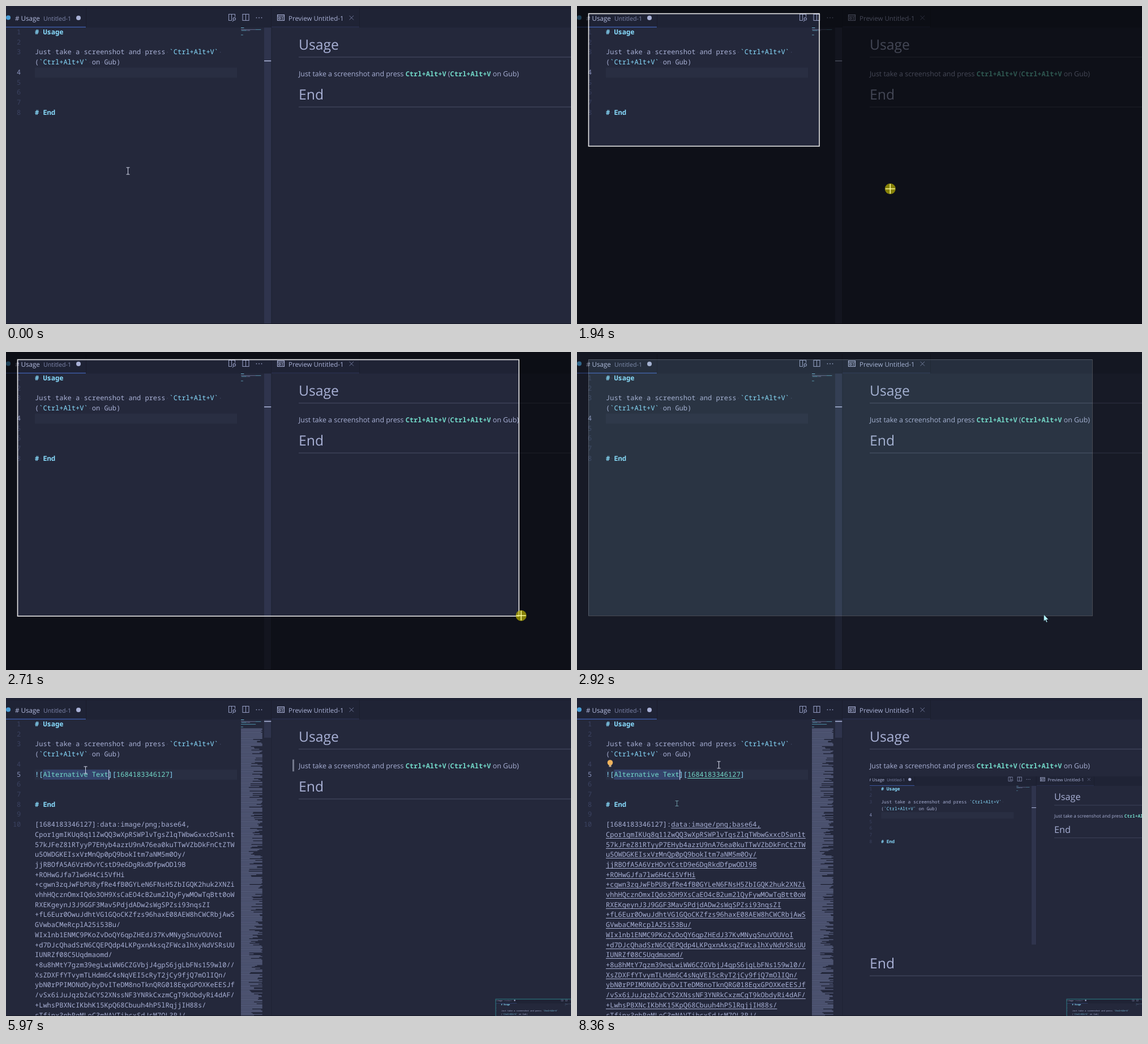
These frames come from a looping animation (998x561 px, 8420 ms). An HTML page with a canvas:

```html
<!DOCTYPE html>
<html lang="en">
<head>
<meta charset="utf-8">
<title>Paste a screenshot</title>
<style>
  html, body { margin: 0; width: 100%; height: 100%; overflow: hidden; background: #24283b; }
  canvas { display: block; width: 100vw; height: 100vh; }
</style>
</head>
<body>
<canvas id="stage" width="998" height="561"></canvas>
<script>
const W = 998, H = 561, LOOP = 8420;
const ctx = document.getElementById("stage").getContext("2d");
ctx.textRendering = "geometricPrecision";

const MONO = "12px 'Noto Sans Mono', monospace", MONO_BOLD = "bold " + MONO;
const sans = size => `${size}px 'Open Sans', sans-serif`;
const TEXT = "#a9b1d6", CYAN = "#89ddff", TEAL = "#73daca", GUTTER = "#3b4261";
const ROW = 17.71, CHAR = 7.2, LEFT = 51;
const KEYS = "Ctrl+Alt+V", SYSTEM = "Gub", ID = "1684183346127";
const CROP = { x: 20, y: 13, w: 890, h: 452 };

// Times of the hard changes, in ms
const PRESS = 1450, RELEASE = 2780, CLICK = 4310, PASTE = 5970, RENDER = 6230, LINK = 6960, LEAVE = 7450;

// Cursor path: time, x, y
const PATH = [
  [0, 215, 291], [70, 215, 291], [900, 150, 174], [PRESS, 20, 13], [1520, 55, 38],
  [1590, 75, 49], [1800, 300, 170], [2080, 803, 473], [2150, 827, 470], [2400, 890, 467],
  [2710, 910, 465], [RELEASE, 902, 465], [2920, 825, 464], [3610, 174, 188], [4170, 140, 127],
  [6500, 140, 127], [6740, 176, 186], [7400, 176, 186], [7660, 420, 330], [7900, 650, 426],
  [8120, 630, 150], [8290, 450, 41], [8359, 450, 41], [8360, 250, 118], [LOOP, 250, 118]
];

const clamp01 = v => Math.max(0, Math.min(1, v));
const ramp = (t, from, to) => clamp01((t - from) / (to - from));
const between = (t, a, b) => t >= a && t < b;

function cursorAt(t) {
  const i = PATH.findIndex(p => p[0] > t), [t0, x0, y0] = PATH[i - 1], [t1, x1, y1] = PATH[i];
  const k = (t - t0) / (t1 - t0);
  return { x: x0 + (x1 - x0) * k, y: y0 + (y1 - y0) * k };
}

function randomizer(seed) {
  return () => (seed = seed * 16807 % 2147483647) / 2147483647;
}

// Each entry: optional leading sign, count of random characters, optional trailing slashes
const random = randomizer(4711);
const ALPHABET = "ABCDEFGHIJKLMNOPQRSTUVWXYZabcdefghijklmnopqrstuvwxyz0123456789";
const blob = "49 49 36/ 37 +21 +48 49 43 +48 20/ 46 +48 18/ +46// 46/ 49 /47/ +40/ 36/".split(" ").map(spec => {
  const [, head, count, tail] = spec.match(/^(\D?)(\d+)(\/*)$/);
  return head + Array.from({ length: count }, () => ALPHABET[Math.floor(random() * 62)]).join("") + tail;
});
const mapRows = Array.from({ length: 325 }, () => random() < 0.45 ? 49 : 18 + Math.floor(random() * 31));

function rect(x, y, w, h, color) {
  ctx.fillStyle = color;
  ctx.fillRect(x, y, w, h);
}

function circle(x, y, r, color) {
  ctx.fillStyle = color;
  ctx.beginPath();
  ctx.arc(x, y, r, 0, 7);
  ctx.fill();
}

function lines(color, width, ...polylines) {
  ctx.strokeStyle = color;
  ctx.lineWidth = width;
  ctx.beginPath();
  for (const points of polylines)
    for (let i = 0; i < points.length; i += 2)
      i ? ctx.lineTo(points[i], points[i + 1]) : ctx.moveTo(points[i], points[i + 1]);
  ctx.stroke();
}

function frame(x, y, w, h, color, width = 1) {
  ctx.strokeStyle = color;
  ctx.lineWidth = width;
  ctx.strokeRect(x, y, w, h);
}

function write(x, y, text, color, font) {
  ctx.font = font;
  ctx.fillStyle = color;
  ctx.fillText(text, x, y);
  return x + ctx.measureText(text).width;
}

const baseline = row => 50 + row * ROW;
const rowTop = row => 37.8 + row * ROW;

// Editor text: runs of [text, color, font] with dots marking the spaces
function code(row, ...runs) {
  let column = 0;
  for (const [text, color = TEXT, font = MONO] of runs) {
    write(LEFT + column * CHAR, baseline(row), text, color, font);
    [...text].forEach((c, i) => {
      if (c === " ") rect(LEFT + (column + i) * CHAR + 3, baseline(row) - 4.5, 1.2, 1.2, "#454c6d");
    });
    column += text.length;
  }
}

function underline(row, from, to, color) {
  rect(LEFT + from * CHAR, Math.round(baseline(row)) + 2, (to - from) * CHAR, 1, color);
}

function tabs() {
  rect(0, 0, W, 38, "#1f2335");
  rect(0, 3, W, 1, "#1b1e2e");
  rect(0, 36.5, 141, 1.5, "#3d59a1");
  rect(469, 36.5, 155, 1, "#30375a");
  for (const x of [141, 468, 624]) rect(x, 4, 1, 34, "#1a1d2c");

  circle(4, 20.5, 4, "#4a9fd8");
  write(16, 25.5, "# Usage", "#b4bce0", sans(11.6));
  write(66, 25.5, "Untitled-1", "#7f87ac", sans(10.6));
  circle(128, 21, 4, TEXT);

  const icon = "#9098bd";
  lines(icon, 1.1, [398.5, 25.5, 393.5, 25.5, 393.5, 14.5, 404.5, 14.5, 404.5, 19], [398.5, 14.5, 398.5, 25.5], [402, 25, 400, 27.5]);
  ctx.beginPath();
  ctx.arc(403.3, 22.8, 2.2, 0, 7);
  ctx.stroke();
  frame(418, 14.5, 11, 11, icon, 1.1);
  lines(icon, 1.1, [423.5, 14.5, 423.5, 25.5]);
  for (const x of [442.5, 447, 451.5]) circle(x, 20.7, 0.9, icon);

  frame(479.5, 15.5, 12, 10, TEXT, 1.1);
  lines(TEXT, 1.1, [479.5, 18, 491.5, 18], [486.5, 20.5, 490, 20.5], [486.5, 23, 490, 23]);
  frame(481.8, 20.2, 2.8, 3, TEXT, 1);
  write(499, 25.5, "Preview Untitled-1", TEXT, sans(11.5));
  lines("#6c7396", 1, [606.5, 17, 614, 24.5], [614, 17, 606.5, 24.5]);
}

function minimap(pasted) {
  const stroke = (row, from, to, color) => rect(415 + from * 0.77, 38 + row * 1.57, (to - from) * 0.77, 1, color);
  stroke(0, 0, 7, "#6fb3d2");
  stroke(2, 0, 33, "#666d90");
  stroke(2, 33, 46, "#5793ad");
  stroke(3, 1, 13, "#5793ad");
  stroke(3, 14, 21, "#666d90");
  if (pasted) {
    stroke(5, 0, 34, "#4d8fa8");
    mapRows.forEach((length, i) => stroke(10 + i, 0, length, "#626a8d"));
  }
  stroke(8, 0, 5, "#5793ad");
}

function editor(s) {
  rect(LEFT, rowTop(s.line), 357, ROW, "#292e42");
  const numbers = [0, 1, 2, 4, 5, 6, 7, 8, 9, 10].slice(0, s.pasted ? 10 : 8);
  ctx.textAlign = "right";
  numbers.forEach((row, i) => write(26.3, baseline(row), String(i + 1), row === s.line ? "#8a93bd" : GUTTER, MONO));
  ctx.textAlign = "left";

  code(0, ["# Usage", CYAN, MONO_BOLD]);
  code(2, ["Just take a screenshot and press "], ["`" + KEYS + "`", CYAN], [" "]);
  code(3, ["("], ["`" + KEYS + "`", CYAN], [` on ${SYSTEM})`]);
  code(8, ["# End", CYAN, MONO_BOLD]);

  if (s.pasted) {
    rect(LEFT + 2 * CHAR, rowTop(5), 16 * CHAR, ROW, "#34436b");
    code(5, ["![", CYAN], ["Alternative Text", TEAL], ["][", CYAN], [ID, TEAL], ["]", CYAN]);
    const scheme = "data", link = `${scheme}:image/png;base64,`, label = `[${ID}]:`;
    code(10, [label + link]);
    blob.forEach((text, i) => code(11 + i, [text]));
    if (s.linked) {
      underline(5, 20, 33, TEAL);
      underline(10, label.length, label.length + link.length, TEXT);
      blob.forEach((text, i) => underline(11 + i, 0, text.length, TEXT));
    }
  }
  if (s.bulb) {
    circle(58.5, 114, 4.8, "#f0b35c");
    rect(56.5, 118, 4, 3.5, "#c9b08a");
  }
  if (s.caret) rect(s.pasted ? 181 : LEFT, rowTop(5) + 0.2, 1.3, ROW, "#c0caf5");

  minimap(s.pasted);
  rect(456, 38, 12.5, s.pasted ? 32 : H - 38, "#2f344d");
  rect(456, s.pasted ? 40.5 : s.line === 4 ? 96 : 110.5, 12.5, 1.6, "#a9b1d6");
  rect(468.5, 38, 1, H - 38, "#1f2335");
}

function preview(s) {
  const heading = (y, text) => {
    write(517, y, text, TEXT, sans(24.7));
    rect(517, y + 12.6, W - 517, 1, "#4a4f68");
  };
  heading(77, "Usage");
  let x = write(517, 123.5, "Just take a screenshot and press ", TEXT, sans(12.4));
  x = write(x, 123.5, KEYS, TEAL, MONO_BOLD);
  x = write(x, 123.5, " (", TEXT, sans(12.4));
  x = write(x, 123.5, KEYS, TEAL, MONO_BOLD);
  write(x, 123.5, ` on ${SYSTEM})`, TEXT, sans(12.4));
  if (s.marker) rect(506, 108.5, 3, 21, "#73788c");
  if (s.rendered) capture(517, 138.5, 0.656);
  heading(s.rendered ? 477 : 165, "End");
}

function app(s) {
  rect(0, 0, W, H, "#24283b");
  editor(s);
  preview(s);
  tabs();
  rect(0, H - 1, W, 1, "#181a27");
}

// The captured part of the window, drawn small
function capture(x, y, scale) {
  ctx.save();
  ctx.translate(x, y);
  ctx.scale(scale, scale);
  ctx.beginPath();
  ctx.rect(0, 0, CROP.w, CROP.h);
  ctx.clip();
  ctx.translate(-CROP.x, -CROP.y);
  app({ line: 4 });
  ctx.restore();
}

function toolbar(shown) {
  const cell = 37.6, height = 38, y = height * (shown - 1), c = y + height / 2;
  if (shown <= 0) return;
  rect(319, y, 5 * cell, height, "#161616");
  rect(319, y, cell, height, "#008c99");
  const mid = i => 319 + cell * (i + 0.5), ink = "#e8e8e8";
  frame(mid(0) - 6, c - 4.5, 12, 9, ink);
  ctx.beginPath();
  ctx.ellipse(mid(1), c, 6.5, 4.5, -0.4, 0, 7);
  ctx.stroke();
  frame(mid(2) - 6, c - 5, 12, 10, ink);
  lines(ink, 1, [mid(2) - 6, c - 2, mid(2) + 6, c - 2]);
  frame(mid(3) - 7, c - 5, 14, 10, ink);
  lines(ink, 1, [mid(4) - 4, c - 4, mid(4) + 4, c + 4], [mid(4) + 4, c - 4, mid(4) - 4, c + 4]);
}

function snip(t) {
  const fade = 1 - ramp(t, RELEASE, 3130), dim = 0.6 * ramp(t, 350, 600) * fade;
  if (dim <= 0) return;
  const selecting = t > PRESS, end = cursorAt(Math.max(PRESS, Math.min(t - 70, 2710)));
  const w = end.x - CROP.x, h = end.y - CROP.y;
  ctx.beginPath();
  ctx.rect(0, 0, W, H);
  if (selecting) ctx.rect(CROP.x, CROP.y, w, h);
  ctx.fillStyle = `rgba(0,0,0,${dim})`;
  ctx.fill("evenodd");
  if (t >= RELEASE) rect(CROP.x, CROP.y, w, h, `rgba(120,190,170,${0.133 * fade})`);
  if (selecting) frame(CROP.x + 0.5, CROP.y + 0.5, w, h, `rgba(255,255,255,${t < RELEASE ? 0.9 : 0.35 * fade})`, t < RELEASE ? 1.6 : 1);
  toolbar(ramp(t, 550, 800) * (1 - ramp(t, 1470, 1616)));
}

function beam(x, y, half, color) {
  lines(color, 1, [x - 3, y - half, x + 3, y - half], [x, y - half, x, y + half], [x - 3, y + half, x + 3, y + half]);
}

function pointer(t) {
  const { x, y } = cursorAt(t);
  if (t >= LEAVE) beam(176.5, 186, 4.5, "rgba(150,215,225,.6)");
  if (between(t, 400, RELEASE)) {
    const pressed = t >= PRESS, ink = pressed ? "#ffff9c" : "#ffffff";
    if (pressed) circle(x, y, 9.5, "rgba(200,190,0,.65)");
    lines(ink, 1.5, [x - 8.5, y, x + 8.5, y], [x, y - 8.5, x, y + 8.5]);
  } else if (x > 414) {
    ctx.beginPath();
    [[0, 0], [0, 12], [2.7, 9.5], [4.6, 14], [6.4, 13.2], [4.5, 8.9], [8.2, 8.9]]
      .forEach(([dx, dy]) => ctx.lineTo(x + 0.5 + dx, y - 0.5 + dy));
    ctx.closePath();
    ctx.fillStyle = "#b4f3fb";
    ctx.fill();
    ctx.strokeStyle = "rgba(15,20,30,.7)";
    ctx.lineWidth = 0.7;
    ctx.stroke();
  } else {
    beam(x + 0.5, y, 6, "#d5d9ea");
  }
}

function render(t) {
  const caretSpans = [[CLICK, 4840], [5570, 6500], [7000, 7500], [8000, LOOP]];
  app({
    line: t < CLICK ? 4 : 5,
    marker: between(t, CLICK, RENDER),
    caret: caretSpans.some(([a, b]) => between(t, a, b)),
    pasted: t >= PASTE,
    bulb: t >= RENDER,
    rendered: t >= RENDER,
    linked: t >= LINK
  });
  if (t >= CLICK) {
    capture(865, 531, 0.31);
    frame(865, 531.2, 276, 140, "#2c7f88");
  }
  snip(t);
  pointer(t);
}

const start = performance.now();
function tick() {
  render((performance.now() - start) % LOOP);
  requestAnimationFrame(tick);
}
tick();
</script>
</body>
</html>
```
